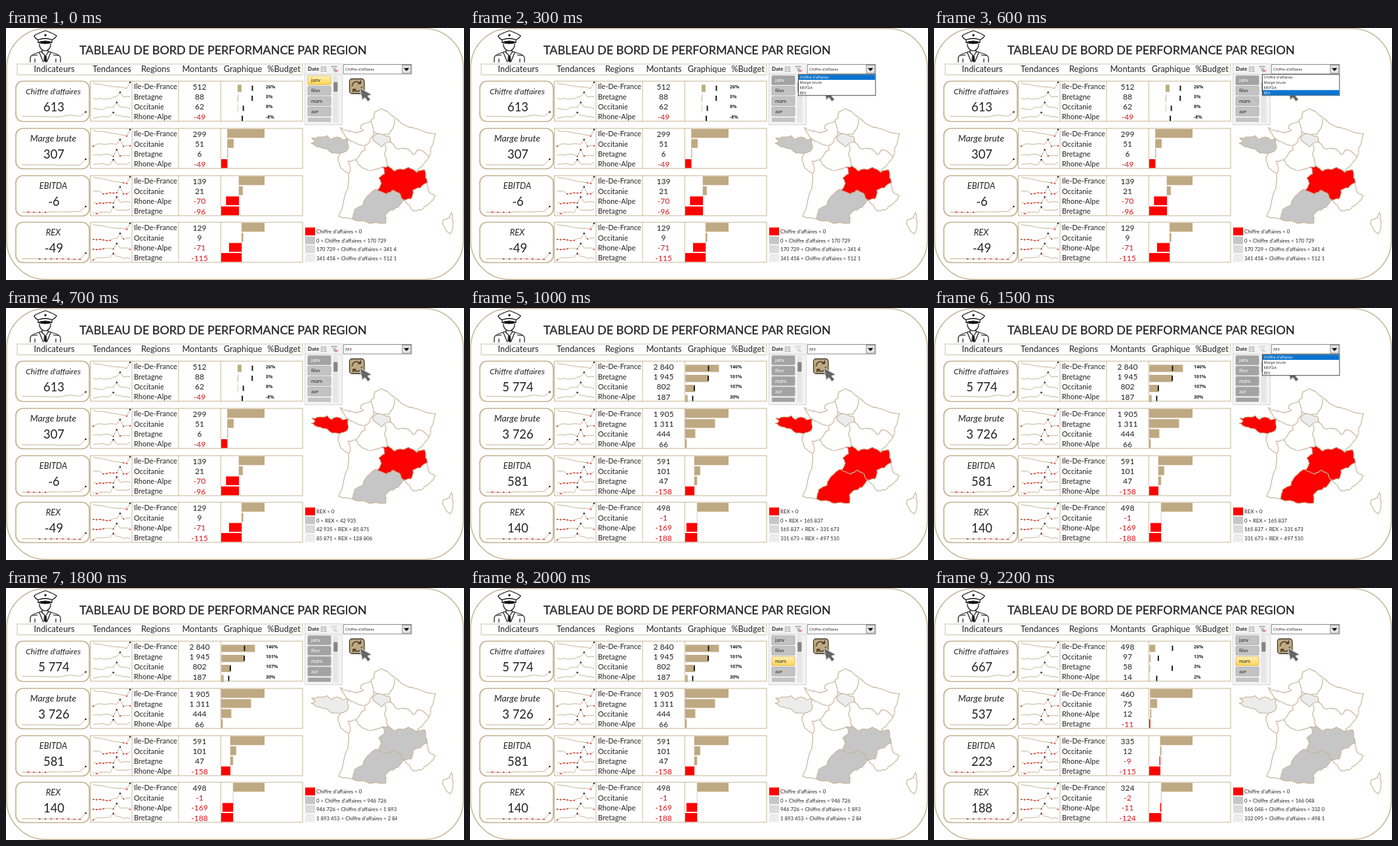
Recreate the animation shown at these times as an HTML page. Size 698 by 384 pixels, loop 2.3 s.

```html
<!DOCTYPE html>
<html lang="fr">
<head>
<meta charset="utf-8">
<style>
html, body { margin: 0; width: 100%; height: 100%; overflow: hidden; background: #fff; }
svg { display: block; width: 698px; height: 384px; }
text { font-family: Lato, sans-serif; fill: #222; white-space: pre; }
.ui { font-family: "Open Sans", sans-serif; }
</style>
</head>
<body>
<svg viewBox="0 0 698 384" xmlns="http://www.w3.org/2000/svg">
  <defs>
    <clipPath id="legendClip"><rect x="450" y="300" width="146" height="62"/></clipPath>
    <linearGradient id="gold" x2="0" y2="1"><stop stop-color="#fff0b8"/><stop offset="1" stop-color="#ffd452"/></linearGradient>
  </defs>
  <g id="base"></g>
  <g id="live"></g>
</svg>
<script>
const TAN = '#c4b393', BAR = '#bfa982', RED = '#fe0000';
const SHADES = [RED, '#c6c6c6', '#dcdcdc', '#ececec'];
const LOOP = 2300;
const NAMES = { I: 'Ile-De-France', B: 'Bretagne', O: 'Occitanie', R: 'Rhone-Alpe' };
const TARGETS = { I: 1950, B: 1930, O: 750, R: 615 };
const KPIS = ["Chiffre d'affaires", 'Marge brute', 'EBITDA', 'REX'];
const KPI_SIZES = [12.4, 13.8, 13, 13];
const TOPS = [81, 153, 225, 296];
const MONTHS = ['janv', 'févr', 'mars', 'avr'];

// Amounts per indicator; totals, ranking, budget shares and map shades follow from them
const DATA = {
  janv: {
    axis: 353, scale: 0.0115,
    kpis: [{ I: 512, B: 88, O: 62, R: -49 }, { I: 299, O: 51, B: 6, R: -49 },
      { I: 139, O: 21, R: -70, B: -96 }, { I: 129, O: 9, R: -71.4, B: -115.4 }]
  },
  all: {
    axis: 328.3, scale: 0.018,
    kpis: [{ I: 2840, B: 1945, O: 802, R: 187 }, { I: 1905, B: 1311, O: 444, R: 66 },
      { I: 591, O: 101, B: 47, R: -158 }, { I: 498, O: -1, R: -169, B: -188 }]
  },
  mars: {
    axis: 328.3, scale: 0.018,
    kpis: [{ I: 498, O: 97, B: 58, R: 14 }, { I: 460.4, O: 75.4, R: 12, B: -11 },
      { I: 335, O: 12, R: -9, B: -115 }, { I: 324.4, O: -1.6, R: -11, B: -124 }]
  }
};

// Each step overrides part of the state
const STEPS = [
  [0, { data: 'janv', slicer: 'janv', focus: true, combo: 0, list: -1, map: 'janv', kpi: 0, top: 512187 }],
  [300, { focus: false, list: 0 }],
  [400, { list: 1 }],
  [500, { list: 2 }],
  [600, { list: 3 }],
  [700, { list: -1, combo: 3, kpi: 3, top: 128806 }],
  [900, { slicer: 'all', data: 'all' }],
  [1000, { map: 'all', top: 497510 }],
  [1300, { list: 3 }],
  [1400, { list: 1 }],
  [1500, { list: 0 }],
  [1700, { list: -1, combo: 0 }],
  [1800, { kpi: 0, top: 2840179 }],
  [2000, { slicer: 'mars', focus: true }],
  [2100, { data: 'mars' }],
  [2200, { top: 498143 }]
];

const num = n => String(Math.round(n)).replace(/\B(?=(\d{3})+$)/g, ' ');
const esc = s => String(s).replace(/</g, '&lt;');
const rect = (x, y, w, h, fill, more = '') =>
  `<rect x="${x}" y="${y}" width="${w}" height="${h}" fill="${fill}" ${more}/>`;
const path = (d, stroke, width = 1, fill = 'none') =>
  `<path d="${d}" fill="${fill}" stroke="${stroke}" stroke-width="${width}" stroke-linejoin="round" stroke-linecap="round"/>`;
const dot = (x, y, r, fill) => `<circle cx="${x}" cy="${y}" r="${r}" fill="${fill}"/>`;
// y is the middle of the capitals
const text = (s, x, y, size, more = '') =>
  `<text x="${x}" y="${y + size * 0.36}" font-size="${size}" ${more}>${esc(s)}</text>`;
const MID = 'text-anchor="middle"';
const frame = w => `stroke="${TAN}" stroke-width="${w}"`;
const rowY = (g, i) => TOPS[g] + 8.3 + 15.3 * i;
const noise = n => Math.sin(n * 12.9898) * 43758.5453 % 1;

// Breaks an edge twice at wobbling midpoints; shared edges break alike
function edge(a, b, depth) {
  if (!depth) return `L${b}`;
  const mx = (a[0] + b[0]) / 2, my = (a[1] + b[1]) / 2;
  const k = Math.min(1.4, Math.hypot(b[0] - a[0], b[1] - a[1]) * 0.13);
  const m = [mx + k * Math.sin(mx * 7 + my * 3), my + k * Math.cos(mx * 5 + my * 11)];
  return edge(a, m, depth - 1) + edge(m, b, depth - 1);
}
function rough(points) {
  const p = points.split(' ').map(s => s.split(',').map(Number));
  return 'M' + p[0] + p.slice(1).map((b, i) => edge(p[i], b, 2)).join('');
}

const REGIONS = {
  B: '521,169 512,170 504,166 497,170 490,164 478,166 466,168 471,173 465,176 474,181 491,186 497,191 509,191 521,185 521,169',
  I: '559,165 567,161 585,166 586,174 572,181 560,172 559,165',
  O: '528,291 531,277 544,270 552,255 563,246 580,253 590,247 602,257 606,262 598,273 585,278 578,285 579,297 560,297 545,294 528,291',
  R: '573,212 582,210 592,218 603,215 614,212 626,220 638,216 642,236 631,244 620,247 617,261 606,262 602,257 590,247 580,253 566,247 572,236 568,229 577,222 573,212'
};
for (const id in REGIONS) REGIONS[id] = rough(REGIONS[id]) + 'Z';

const BORDERS = [
  '573,123 562,128 561,137 556,142 543,147 540,153 545,156 535,160 521,157 510,151 516,163 521,169',
  '509,191 506,198 510,213 522,223 518,250 513,272 507,287 528,291',
  '606,262 622,279 634,277 648,264 654,256 645,250 642,236',
  '573,123 587,133 606,147 633,156 655,161 647,183 645,196 634,211 626,220',
  '556,142 560,157 570,162 584,163 588,155 592,138',
  '560,157 559,165 547,179 531,174 521,169',
  '586,172 598,185 612,184 620,193 627,186 638,190 645,196',
  '578,178 577,194 582,210',
  '547,179 547,186 533,201 542,213 552,217 573,212',
  '533,201 521,203 525,213 522,223',
  '679,281 676,288 667,292 666,300 671,309 677,314 681,301 679,281'
].map(rough).join('');

function spark(x, y, step, value, limit, size) {
  const vals = Array.from({ length: 12 }, (_, i) => value(i));
  const pts = vals.map((v, i) => [x + i * step, y + v]);
  const best = vals.indexOf(Math.min(...vals));
  return path('M' + pts.join('L'), TAN, 1) +
    pts.map((p, i) => i === best ? dot(...p, size, '#222') : vals[i] > limit ? dot(...p, size * 0.85, '#e01818') : '').join('');
}

// Row trends: a sagging or uneven line with one peak
function trend(g, r) {
  const peak = r ? 9 - r : 11;
  return i => i === peak ? -6.5
    : r ? 2 - (r === 3 ? i * 0.25 : 0) + 2.4 * noise(i + r * 17 + g * 5)
    : -5.5 + i * 0.85 + noise(i + g * 5);
}
const cardTrend = g => i => i === 11 ? -8 : (g ? 0.6 : -1.5) + (g ? 1 : 3) * noise(i + g * 9) * i / 10;

function pilot() {
  const ink = (d, w = 1.2, fill) => path(d, '#111', w, fill);
  return ink('M43 12Q46 9 60 4Q74 9 77 12Q76 15 70 18Q60 14 49 18Q44 16 43 12Z', 1.3) +
    ink('M49 18V22Q60 18 70 22V18') + ink('M49 22Q60 18 70 22Q60 26 49 22Z', 0.8, '#111') + dot(60, 11, 1.8, '#111') +
    ink('M51 24V27Q53 34 60 35Q66 34 68 27V24M55 34V37M64 34V37') +
    ink('M37 52V45Q38 40 54 36L60 43L65 36Q82 40 83 45V52M51 38L57 52M68 38L62 52M41 42L48 41M79 42L72 41M44 47V52M76 47V52') +
    ink('M58.5 43H61.5L62 50L60 52L58 50Z', 0.6, '#111');
}

function base() {
  let s = rect(1, 0.7, 696, 382.6, '#fff', `rx="60" ${frame(1.5)}`) + pilot() +
    text('TABLEAU DE BORD DE PERFORMANCE PAR REGION', 112, 33.4, 17.95, 'stroke="#222" stroke-width="0.3"') +
    rect(17, 55, 435, 16.5, '#fff', frame(0.8));
  [['Indicateurs', 73.5], ['Tendances', 161.5], ['Regions', 228], ['Montants', 295.5], ['Graphique', 361], ['%Budget', 423.5]]
    .forEach(([h, x]) => s += text(h, x, 62.7, 12.8, MID));
  TOPS.forEach((y, g) => {
    s += rect(15, y, 112, 61.5, '#fff', `rx="11" ${frame(1.7)}`) +
      rect(128.5, y, 323.5, 61, '#fff', frame(1)) +
      path(`M192 ${y}v61M263 ${y}v61M327.3 ${y}v61`, TAN, 0.9) +
      text(KPIS[g], 72, y + 15.3, KPI_SIZES[g], MID + ' font-style="italic"') +
      spark(25, y + 55, 8.77, cardTrend(g), g > 1 ? 0.6 : 99, 1.3);
    for (let r = 0; r < 4; r++) s += spark(133, rowY(g, r), 5.1, trend(g, r), g ? 3.6 - g * 0.7 : 99, 1.25);
  });
  // refresh button with its pointer
  return s + rect(523.5, 77.5, 22.5, 22.5, BAR, 'rx="4" stroke="#40382a" stroke-width="1.3"') +
    path('M527.5 88A7.2 7.2 0 0 1 540 84M542 90A7.2 7.2 0 0 1 529.5 94M540.5 80.5V84.5H536.5M529 97.5V93.5H533', '#2b2721', 1.3) +
    path('M539.5 92L543 109.5L547 106L551.5 112L555.5 109L551 103.5L557 101.5Z', '#e8e4dc', 0.9, '#666');
}

function table(d) {
  let s = '';
  d.kpis.forEach((amounts, g) => {
    const rows = Object.entries(amounts).sort((a, b) => b[1] - a[1]);
    const vals = rows.map(r => r[1]);
    const lo = Math.min(0, ...vals), k = g ? 66 / (vals[0] - lo) : d.scale;
    const axis = g ? 328 - lo * k : d.axis;
    s += text(num(vals.reduce((a, b) => a + b)), 73, TOPS[g] + 39, 18.4, MID);
    if (g) s += path(`M${axis} ${TOPS[g] + 1}v59`, '#d5ccba', 0.7);
    rows.forEach(([id, v], i) => {
      const y = rowY(g, i), w = Math.abs(v) * k;
      s += text(NAMES[id], 195, y, 11) +
        text(num(v), 295, y, 12, MID + (v < 0 ? ' style="fill:#d9161c"' : ''));
      if (g) {
        s += rect(v < 0 ? axis - w : axis, y - 7.3, w, 13.4, v < 0 ? RED : BAR);
      } else {
        s += rect(axis, y - 2.8, Math.max(0, v * k), 11, BAR) +
          rect(axis + TARGETS[id] * k - 0.9, y - 1.5, 1.9, 8, '#111') +
          text(Math.round(v / TARGETS[id] * 100) + '%', 396, y, 7, 'class="ui" font-weight="bold"');
      }
    });
  });
  return s;
}

function slicer(st) {
  const off = st.slicer === 'all';
  let s = rect(455.5, 54.5, 57, 93, '#f3f3f3', 'stroke="#cfcfcf" stroke-width="0.8"') +
    text('Date', 460, 62.5, 8, 'font-weight="bold"') + path('M457 70.5H511', '#c8c8c8', 0.7);
  for (let i = 0; i < 3; i++) s += path(`M480 ${59.7 + i * 3}l1 1l1.4 -2M484 ${59.7 + i * 3}h4`, '#555', 0.7);
  s += path('M496.5 58.5H504L501.3 62V66.5L499.3 65V62Z', off ? '#b5b5b5' : '#666', 0.7) +
    path('M502 63.5l3.5 3.5m0 -3.5l-3.5 3.5', off ? '#c5c5c5' : '#e02020', 0.9);
  MONTHS.forEach((m, i) => {
    const on = off || st.slicer === m, gold = on && !off && st.focus, y = 72.8 + i * 15.9;
    const fill = gold ? 'url(#gold)' : on ? '#a3a3a3' : '#c3c3c3';
    s += rect(460, y, 35, 13.6, fill, `rx="1.2" stroke="${gold ? '#c9a53a' : '#999'}" stroke-width="0.6"`) +
      text(m, 465, y + 6.8, 8, on && !gold ? 'style="fill:#fff"' : '');
  });
  return s + rect(460, 136.5, 35, 6.5, off ? '#a3a3a3' : '#c3c3c3', 'rx="1"') +
    rect(498.5, 72.5, 7.5, 71, '#e6e6e6') + rect(499.3, 82.5, 6, 14.5, '#858585');
}

function combo(st) {
  let s = rect(514.5, 55.5, 103.5, 14.5, '#fff', 'stroke="#8a8a8a" stroke-width="1"') +
    rect(604, 56.5, 13, 12.5, '#e4e4e4', 'stroke="#777" stroke-width="0.8"') +
    path('M607 61.3H614L610.5 65.2Z', '#000', 0.5, '#000') +
    text(KPIS[st.combo], 517, 63, 5.8, 'class="ui"');
  if (st.list < 0) return s;
  s += rect(500.5, 70.8, 117.5, 32, '#fff', 'stroke="#333" stroke-width="0.9"');
  KPIS.forEach((name, i) => {
    const y = 71.2 + i * 7.8, on = i === st.list;
    if (on) s += rect(501, y, 116.5, 7.8, '#0a74d0');
    s += text(name, 502.5, y + 3.9, 5.8, 'class="ui"' + (on ? ' style="fill:#fff"' : ''));
  });
  return s;
}

function mapAndLegend(st) {
  const amounts = DATA[st.map].kpis[st.kpi], name = KPIS[st.kpi];
  const shade = v => v < 0 ? 0 : Math.min(3, 1 + Math.floor(3 * v / amounts.I));
  let s = path(BORDERS, TAN, 1.15);
  for (const id in REGIONS) s += path(REGIONS[id], TAN, 1.1, SHADES[shade(amounts[id])]);
  s += '<g clip-path="url(#legendClip)">';
  SHADES.forEach((c, i) => {
    const y = 304 + i * 13.5, from = num(st.top * (i - 1) / 3), to = num(st.top * i / 3);
    s += rect(456, y, 15, 12, c) +
      text(i ? `${from} < ${name} < ${to}` : `${name} < 0`, 473, y + 6.3, 7.8);
  });
  return s + '</g>';
}

const live = document.getElementById('live');
document.getElementById('base').innerHTML = base();
let shown = -1;

function draw(t) {
  const count = STEPS.filter(([at]) => at <= t).length;
  if (count === shown) return;
  shown = count;
  const st = Object.assign({}, ...STEPS.slice(0, count).map(step => step[1]));
  live.innerHTML = table(DATA[st.data]) + mapAndLegend(st) + slicer(st) + combo(st);
}

let start;
function tick(now) {
  if (start === undefined) start = now;
  draw((now - start) % LOOP);
  requestAnimationFrame(tick);
}
draw(0);
requestAnimationFrame(tick);
</script>
</body>
</html>
```
